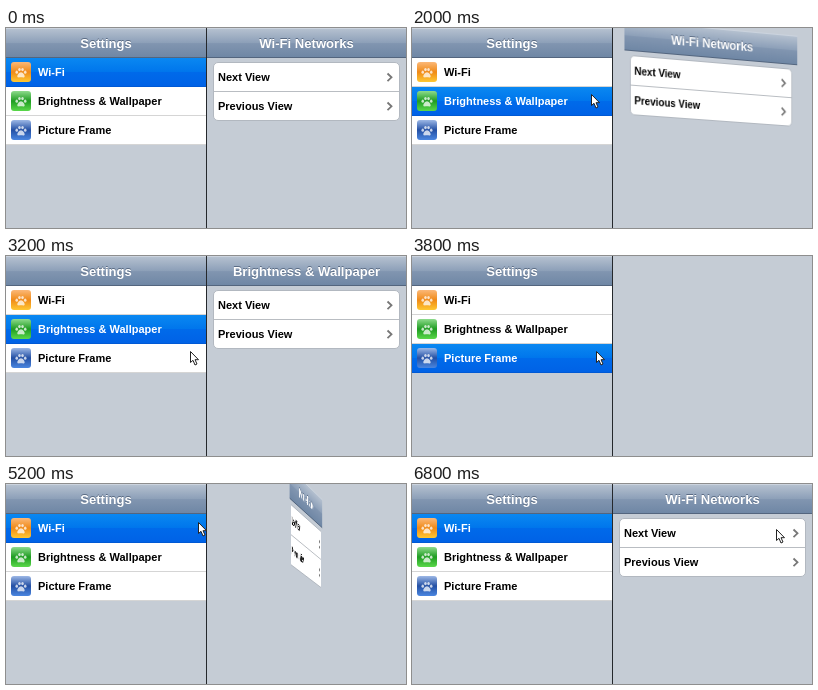
An HTML page that plays this animation: 400x200 px, repeating every 8 s.

```html
<!DOCTYPE html>
<html lang="en">
<head>
<meta charset="utf-8">
<title>Split view flip</title>
<style>
html, body { margin: 0; width: 100%; height: 100%; overflow: hidden; }
#stage {
  position: relative; width: 400px; height: 200px; overflow: hidden;
  background: #c5ccd5; font: bold 11px/29px "Liberation Sans", Arial, sans-serif;
}
#stage div, #stage svg { position: absolute; box-sizing: border-box; white-space: nowrap; }
.side { top: 0; width: 200px; height: 200px; }
.bar {
  left: 0; top: 0; width: 100%; height: 30px; text-align: center;
  font-size: 13.1px; line-height: 29px; color: #fff; text-shadow: 0 -1px #5b6c84;
  background: linear-gradient(#b4c0cf, #8c9fb8 50%, #8195b0 52%, #6f87a5);
  border-top: 1px solid #cbd3de; border-bottom: 1px solid #53657e;
}
.row {
  left: 0; width: 200px; height: 29px; padding-left: 32px; color: #000;
  background: #fff; border-bottom: 1px solid #d5d5d5;
}
.row.on { color: #fff; background: linear-gradient(#0a88f1, #0076ec 49%, #006aea 51%, #0062e6); border-color: #0059d5; }
.row svg { left: 5px; top: 4px; }
#view { left: 201px; width: 199px; perspective: 2600px; perspective-origin: 50% 420px; }
#panel { left: 0; top: 0; width: 199px; height: 200px; }
#list {
  left: 6px; top: 34px; width: 187px; height: 59px; border-radius: 5px;
  background: #fff; border: 1px solid #b2b8c0;
}
.item { left: 0; width: 185px; height: 29px; padding-left: 4px; color: #000; }
.item + .item { top: 28px; border-top: 1px solid #b9bdc2; }
.item svg { left: 172px; top: 9px; }
#line { left: 200px; top: 0; width: 1px; height: 200px; background: #25282c; }
</style>
</head>
<body>
<div id="stage">
  <div class="side" style="left:0"><div class="bar">Settings</div><div id="rows"></div></div>
  <div class="side" id="view">
    <div id="panel">
      <div class="bar" id="title"></div>
      <div id="list"></div>
    </div>
  </div>
  <div id="line"></div>
  <svg id="cursor" width="11" height="16" style="left:0;top:0">
    <path d="M.5 .5V11.5L3 9.3L5 14L7 13L5 8.7H8.5Z" fill="#fff" stroke="#222"/>
  </svg>
</div>
<script>
const $ = id => document.getElementById(id);
const LOOP = 8000, STEP = 200, FLIP = 750;

const names = ["Wi-Fi", "Brightness & Wallpaper", "Picture Frame"];
const titles = ["Wi-Fi Networks", names[1], names[2]];
// top, middle and bottom of each icon
const tints = [["#fbb878", "#f08a18", "#ffc832"], ["#8edb8c", "#1f9c22", "#5ad84a"], ["#9db8e6", "#2450a4", "#4a86e0"]];

const paw = ([top, mid, low], i) => `<svg width="20" height="20">
  <linearGradient id="tint${i}" x2="0" y2="1"><stop stop-color="${top}"/>
    <stop offset=".5" stop-color="${mid}"/><stop offset="1" stop-color="${low}"/></linearGradient>
  <rect width="20" height="20" rx="3" fill="url(#tint${i})"/>
  <g transform="translate(1.5 2.5) scale(.85)" fill="#fff" fill-opacity=".75">
    <ellipse cx="5" cy="9" rx="1.5" ry="2"/><ellipse cx="8.2" cy="6" rx="1.5" ry="2"/>
    <ellipse cx="11.8" cy="6" rx="1.5" ry="2"/><ellipse cx="15" cy="9" rx="1.5" ry="2"/>
    <path d="M10 9C7.5 9 5.5 12.5 5.7 14.2S8.5 15 10 15S14.1 16 14.3 14.2S12.5 9 10 9Z"/></g></svg>`;

$("rows").innerHTML = names.map((name, i) =>
  `<div class="row" style="top:${30 + 29 * i}px">${paw(tints[i], i)}${name.replace("&", "&amp;")}</div>`).join("");
$("list").innerHTML = ["Next View", "Previous View"].map(text =>
  `<div class="item">${text}<svg width="8" height="11">
    <path d="M1.5 1.5L5.5 5.3L1.5 9.1" fill="none" stroke="#777" stroke-width="1.8"/></svg></div>`).join("");
const rows = document.querySelectorAll(".row");

// start time and row selected
const flips = [[1800, 1], [3425, 2], [4850, 0]];
// time, x, y of the pointer tip
const track = [[600, 327, 88], [1600, 179, 66], [2800, 179, 66], [3200, 184, 95],
  [4200, 184, 95], [4800, 192, 42], [5000, 192, 38], [5800, 192, 38], [6800, 364, 45]];

const ease = p => (1 - Math.cos(Math.PI * p)) / 2;

function pointer(t) {
  const next = track.findIndex(k => k[0] > t);
  if (next < 0) return track[track.length - 1].slice(1);
  const [t0, x0, y0] = track[next - 1], [t1, x1, y1] = track[next];
  const p = (t - t0) / (t1 - t0);
  return [x0 + (x1 - x0) * p, y0 + (y1 - y0) * p];
}

function draw(t) {
  let selected = 0, shown = 0, angle = 0;
  for (const [start, row] of flips) {
    if (t < start) break;
    angle = 180 * ease(Math.min(1, (t - start) / FLIP));
    selected = row;
    if (angle >= 90) { shown = row; angle -= 180; }
  }
  rows.forEach((row, i) => row.classList.toggle("on", i === selected));
  $("title").textContent = titles[shown];
  $("panel").style.transform = angle ? `rotateY(${angle}deg)` : "none";

  const visible = t >= track[0][0];
  $("cursor").style.display = visible ? "" : "none";
  if (visible) {
    const [x, y] = pointer(t);
    $("cursor").style.transform = `translate(${Math.round(x)}px, ${Math.round(y)}px)`;
  }
}

const begin = performance.now();
function tick() {
  const t = (performance.now() - begin) % LOOP;
  draw(Math.floor(t / STEP) * STEP);
  requestAnimationFrame(tick);
}
tick();
</script>
</body>
</html>
```
